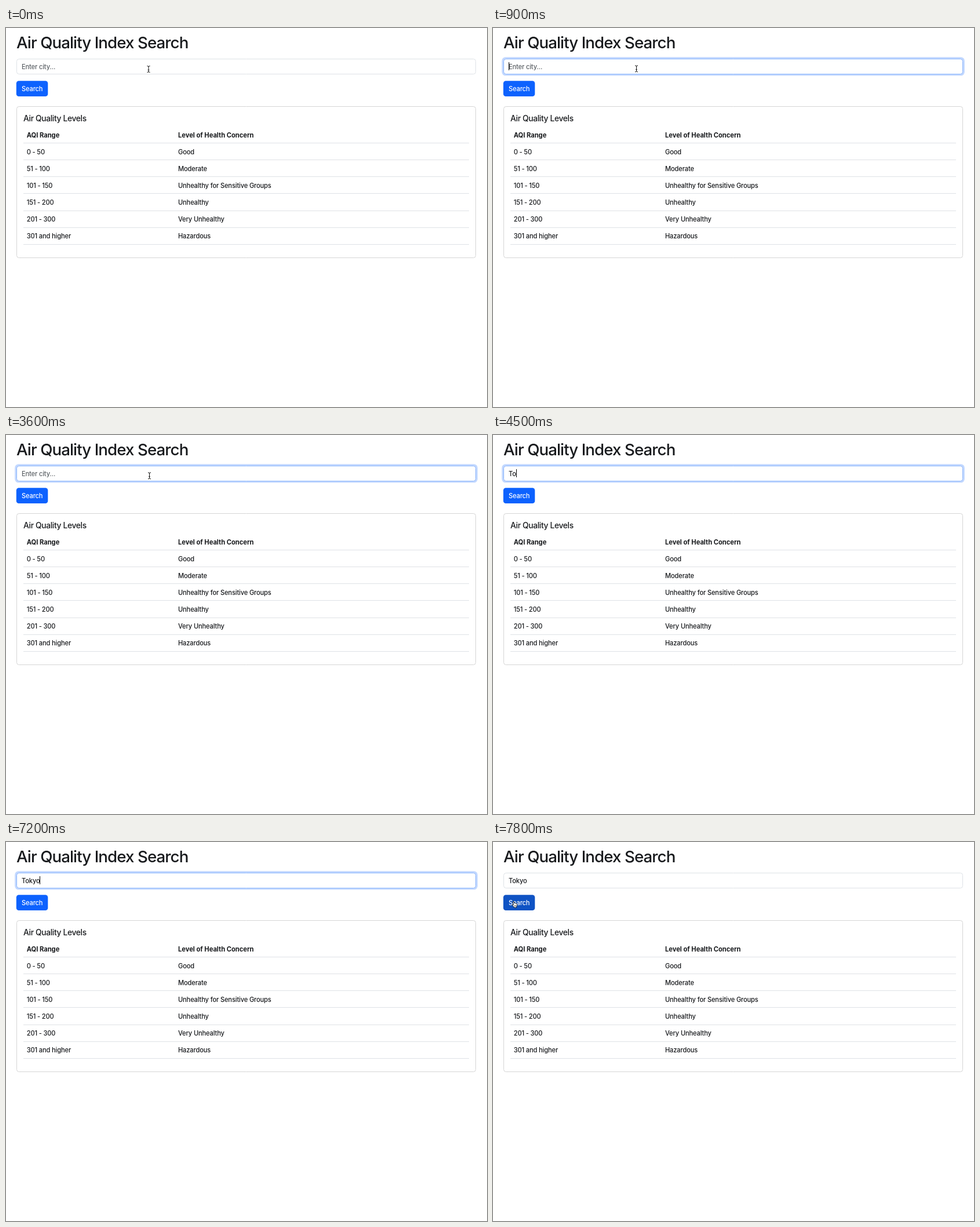
These frames come from a looping animation (830x654 px, 8 s). An HTML page with a canvas:

```html
<!DOCTYPE html>
<html lang="en">
<head>
<meta charset="utf-8">
<title>Air Quality Index Search</title>
<style>
  html, body { margin: 0; width: 100%; height: 100%; overflow: hidden; background: #fff; }
  canvas { display: block; }
</style>
</head>
<body>
<canvas id="stage" width="830" height="654"></canvas>
<script>
const ctx = document.getElementById('stage').getContext('2d');
const LOOP = 8000;
const INK = '#181a1d', LINE = '#dee2e6';
const FONTS = {
  title:   { font: '530 27.7px Inter, sans-serif', spacing: '-0.92px' },
  heading: { font: '540 13.8px Inter, sans-serif', spacing: '-0.34px' },
  bold:    { font: '700 11.2px Inter, sans-serif', spacing: '-0.03px' },
  body:    { font: '450 11.1px Inter, sans-serif', spacing: '-0.14px' }
};
const ROWS = [
  ['AQI Range', 'Level of Health Concern'],
  ['0 - 50', 'Good'],
  ['51 - 100', 'Moderate'],
  ['101 - 150', 'Unhealthy for Sensitive Groups'],
  ['151 - 200', 'Unhealthy'],
  ['201 - 300', 'Very Unhealthy'],
  ['301 and higher', 'Hazardous']
];
// Each step: start time and the text typed from then on.
const TYPING = [[0, ''], [3900, 'T'], [4500, 'To'], [5100, 'Tok'], [6600, 'Toky'], [7200, 'Tokyo']];
const CARET_ON = [[600, 1800], [2700, 3600], [3900, 5700], [6600, 7500]];

const within = (t, from, to) => t >= from && t < to;

function write(text, x, y, style = 'body', color = INK) {
  ctx.font = FONTS[style].font;
  ctx.letterSpacing = FONTS[style].spacing;
  ctx.fillStyle = color;
  ctx.fillText(text, x, y);
  return ctx.measureText(text).width;
}

function box(x, y, w, h, r, fill, stroke) {
  ctx.beginPath();
  ctx.roundRect(x, y, w, h, r);
  if (fill) { ctx.fillStyle = fill; ctx.fill(); }
  if (stroke) { ctx.strokeStyle = stroke; ctx.lineWidth = 1; ctx.stroke(); }
}

function ring(x, y, r) {
  ctx.beginPath();
  ctx.arc(x, y, r, 0, 2 * Math.PI);
  ctx.strokeStyle = '#000';
  ctx.lineWidth = 1.2;
  ctx.stroke();
}

function drawTable() {
  box(18.5, 135.5, 792, 261, 4, '#fff', '#d5d5d5');
  write('Air Quality Levels', 30, 161, 'heading');
  ROWS.forEach(([range, level], i) => {
    const style = i ? 'body' : 'bold';
    const y = 188.6 + i * 29.1;
    write(range, 35.7, y, style);
    write(level, 297, y, style);
    ctx.fillStyle = LINE;
    ctx.fillRect(30, Math.round(198 + i * 29.13), 769, 1);
  });
}

function drawInput(t) {
  const focused = within(t, 900, 7800);
  if (focused) box(15.2, 50.2, 798.6, 32.1, 6.5, '#c2d8ff');
  box(18.5, 53.5, 792, 26, 4, '#fff', focused ? '#8bb5fb' : LINE);
  const typed = TYPING.filter(([start]) => t >= start).pop()[1];
  const width = typed ? write(typed, 27, 70.6) : 0;
  if (!typed) write('Enter city...', 27, 70.6, 'body', '#5c6166');
  if (CARET_ON.some(([from, to]) => within(t, from, to))) {
    ctx.fillStyle = '#000';
    ctx.fillRect(Math.round(27 + width), 59, 1, 14);
  }
}

function drawBeam(x, y) {
  ctx.beginPath();
  for (const s of [-1, 1]) {
    ctx.moveTo(x - 2.5, y + s * 5.5);
    ctx.quadraticCurveTo(x, y + s * 5.5, x, y + s * 4);
    ctx.quadraticCurveTo(x, y + s * 5.5, x + 2.5, y + s * 5.5);
  }
  ctx.moveTo(x, y - 4.5);
  ctx.lineTo(x, y + 4.5);
  ctx.moveTo(x - 1.3, y + 1.5);
  ctx.lineTo(x + 1.3, y + 1.5);
  ctx.strokeStyle = '#111';
  ctx.lineWidth = 1;
  ctx.stroke();
}

function drawHand(x, y) {
  ctx.save();
  ctx.translate(x, y);
  const hand = new Path2D('M1.2 .8Q2-.3 2.8 .8L3.8 3.8Q4.8 3 5.4 4Q6.4 3.4 7 4.5' +
    'Q8.4 4.2 8.5 5.8Q8.7 8 7.6 9.6V11H3.5L2.8 9.7L.2 6.8Q0 5.5 1.4 6L2.4 6.8Z');
  ctx.fillStyle = '#fff';
  ctx.strokeStyle = '#000';
  ctx.lineWidth = .8;
  ctx.fill(hand);
  ctx.stroke(hand);
  ctx.stroke(new Path2D('M4.6 7.2V9.2M6.2 7.2V9.2'));
  ctx.restore();
}

function draw(t) {
  ctx.fillStyle = '#fff';
  ctx.fillRect(0, 0, 830, 654);
  write('Air Quality Index Search', 18, 35, 'title');
  drawInput(t);
  const button = t < 7500 ? '#0d62fe' : t < 7800 ? '#0b50d0' : '#0f53c4';
  box(17.8, 91.2, 54.5, 26.8, 4.3, button);
  write('Search', 27, 108.8, 'body', '#fff');
  drawTable();

  if (t < 300) drawBeam(246, 71);
  else if (t < 3900) drawBeam(247.5, 70.3);
  if (within(t, 600, 900)) ring(247, 70, 12.5);
  if (t >= 7500) drawHand(33, 102);
  if (within(t, 7500, 7800)) ring(35.5, 102, 21.5);
}

function tick() {
  draw(performance.now() % LOOP);
  requestAnimationFrame(tick);
}
tick();
</script>
</body>
</html>
```
